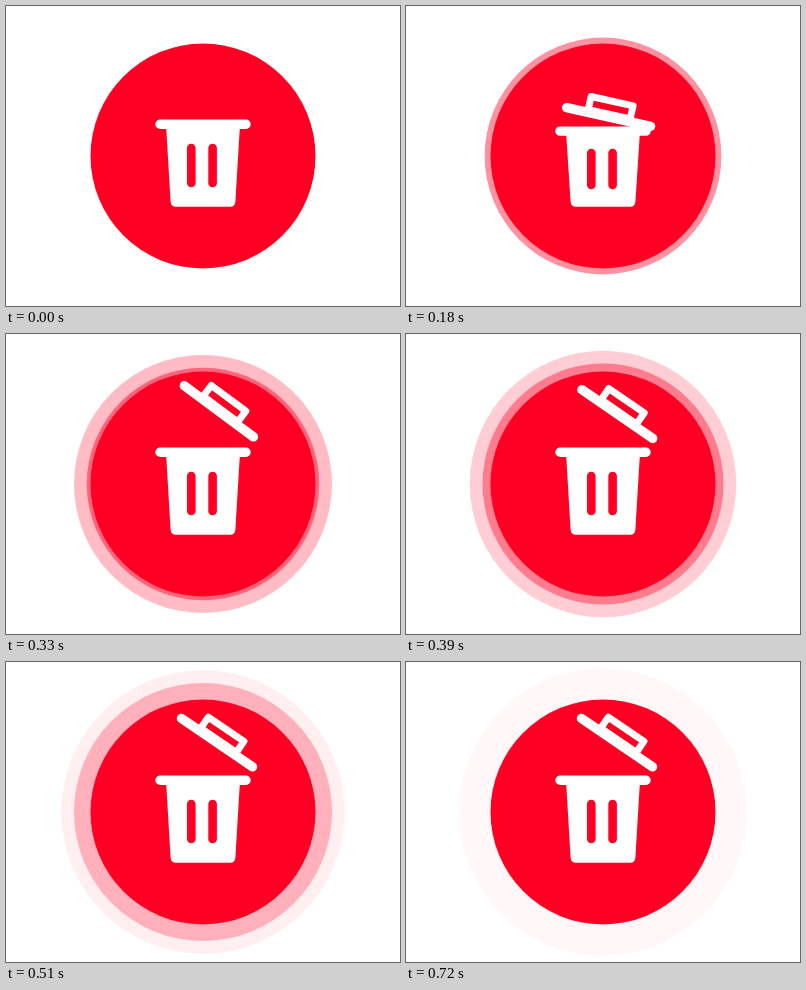
Write an HTML page that moves like this. It is 394 px wide and 300 px high and loops after 1.77 s.

```html
<!DOCTYPE html>
<html lang="en">
<head>
<meta charset="utf-8">
<title>Trash can opening</title>
<style>
  html, body { margin: 0; height: 100%; overflow: hidden; background: #fff; }
  svg { display: block; width: 100%; height: 100%; }
  .red { fill: #ff0024; }
  .line { fill: none; stroke: #fff; stroke-linecap: round; stroke-linejoin: round; }
</style>
</head>
<body>
<svg viewBox="0 0 394 300">
  <circle class="red ring" cx="197" cy="150"/>
  <circle class="red ring" cx="197" cy="150"/>
  <circle class="red" cx="197" cy="150" r="112.5"/>
  <path id="body" fill="#fff"/>
  <path id="rim" class="line" stroke-width="9.4" d="M-43 0H43"/>
  <path id="slots" class="line" style="stroke:#ff0024" stroke-width="8.6"/>
  <g id="lid" class="line">
    <path stroke-width="9.4" d="M-43 0H43"/>
    <path stroke-width="7" d="M-21.5 -16.2H21.5V-2.7H-21.5Z"/>
  </g>
</svg>
<script>
const LOOP = 1770, STEP = 30, LAST = 720;
const CX = 197, RIM = 118.2, BASE = 200.8;
const $ = id => document.getElementById(id);
const rings = document.querySelectorAll('.ring');

// Eased value through [time, value] keys
function track(t, keys) {
  let [t0, v0] = keys[0];
  for (const [t1, v1] of keys) {
    if (t < t1) {
      const p = (t - t0) / (t1 - t0);
      return v0 + (v1 - v0) * p * p * (3 - 2 * p);
    }
    [t0, v0] = [t1, v1];
  }
  return v0;
}

function draw(t) {
  rings.forEach((ring, i) => {
    const age = t - 97 - 180 * i;
    const shown = age > 0 && age < 470;
    ring.setAttribute('r', shown ? 112.5 + age * 0.0708 : 0);
    ring.setAttribute('opacity', shown ? 0.52 * (1 - age / 470) : 0);
  });

  // The can squashes towards its base, then springs back
  const drop = track(t, [[0, 0], [120, 10.4], [275, 0]]);
  const rim = RIM + drop;
  const k = (BASE - rim) / (BASE - RIM);
  const y = v => BASE - (BASE - v) * k;
  $('rim').setAttribute('transform', `translate(${CX} ${rim})`);
  $('body').setAttribute('d',
    `M160 ${rim}L164.6 ${BASE - 5}Q165 ${BASE} 170 ${BASE}` +
    `H224Q229 ${BASE} 229.4 ${BASE - 5}L234 ${rim}Z`);
  $('slots').setAttribute('d', [185.3, 206.6].map(x => `M${x} ${y(142)}V${y(177)}`).join(''));

  const dx = track(t, [[120, 0], [275, 16.8], [420, 14]]);
  const dy = track(t, [[0, 0], [120, 10.4], [275, -42.5], [420, -37.6]]);
  const turn = track(t, [[120, 0], [275, 37.6], [420, 34.2]]);
  $('lid').setAttribute('transform',
    `translate(${CX + dx} ${RIM + dy}) rotate(${t > 120 ? turn : 0})`);
}

function frame() {
  const t = performance.now() % LOOP;
  draw(Math.min(Math.floor(t / STEP) * STEP, LAST));
  requestAnimationFrame(frame);
}
frame();
</script>
</body>
</html>
```
